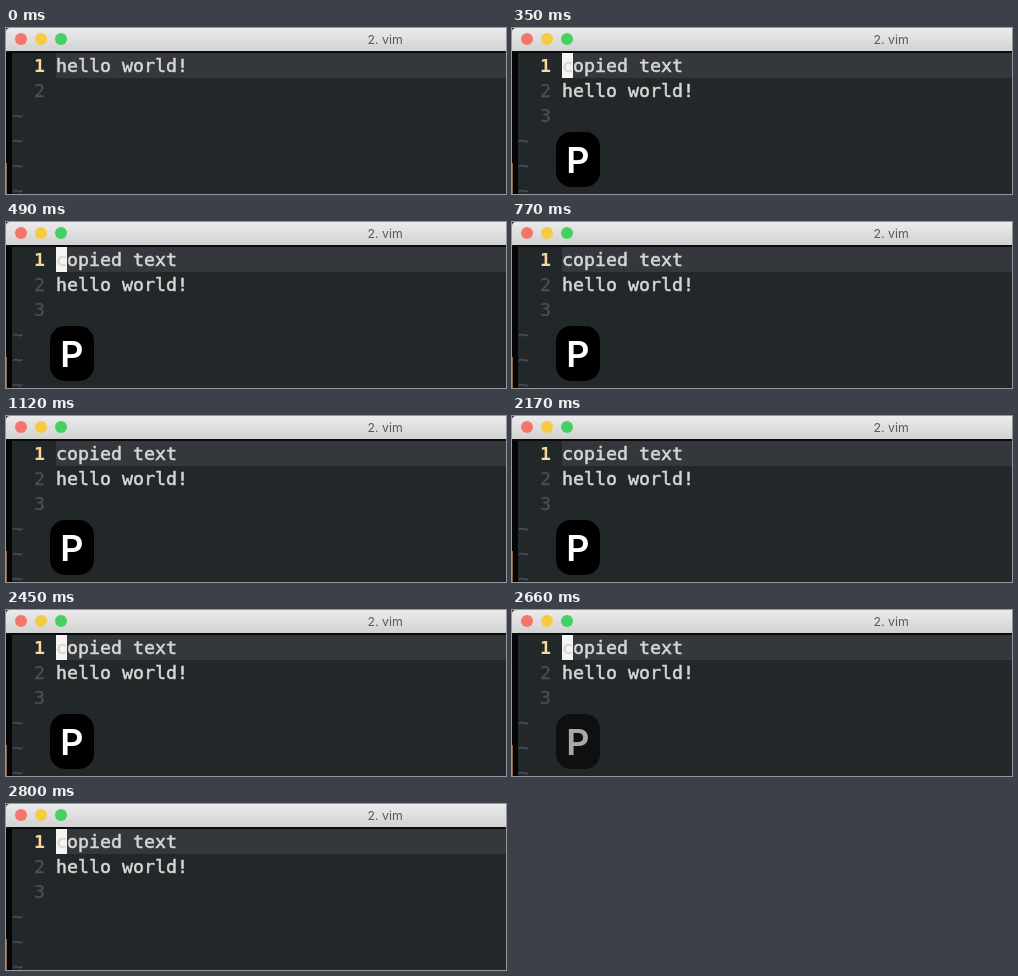
An HTML page that plays this animation: 500x166 px, repeating every 2940 ms.

```html
<!DOCTYPE html>
<html lang="en">
<head>
<meta charset="utf-8">
<title>Paste in vim</title>
<style>
html, body { margin: 0; width: 100%; height: 100%; overflow: hidden; background: #22272a; }
svg { display: block; width: 100%; height: 100%; }
.code { font: 18.27px "DejaVu Sans Mono", "Noto Sans Mono", monospace; }
.code text { fill: #d6d6d3; stroke: #d6d6d3; stroke-width: .55px; }
.code .dim { fill: #4a4f53; stroke: #4a4f53; stroke-width: .3px; }
.code .now { fill: #f8d898; stroke: none; font-weight: bold; }
.title { font: 12.3px Inter, "Open Sans", sans-serif; fill: #5a5a5a; }
.key { font: 600 36px Inter, Roboto, sans-serif; fill: #fff; }

.before, .after, .cursor, .badge { animation: 2940ms step-end infinite; }
.before { animation-name: before; }
.after { animation-name: after; }
.cursor { animation-name: blink; }
.badge { animation-name: press; }

/* the paste lands at 140 ms */
@keyframes before { 0% { opacity: 1 } 4.761%, 100% { opacity: 0 } }
@keyframes after { 0% { opacity: 0 } 4.761%, 100% { opacity: 1 } }

/* 560 ms on, 560 ms off, starting at 210 ms */
@keyframes blink {
  0%, 26.19%, 64.285% { opacity: 0 }
  7.142%, 45.238%, 83.333%, 100% { opacity: 1 }
}

/* appears at 70 ms, fades from 2590 to 2800 ms */
@keyframes press {
  0% { opacity: 0 }
  2.38% { opacity: 1 }
  88.095% { opacity: .86 }
  90.476% { opacity: .6 }
  92.857% { opacity: .28 }
  95.238%, 100% { opacity: 0 }
}
</style>
</head>
<body>
<svg viewBox="0 0 500 166" preserveAspectRatio="none">
  <defs>
    <linearGradient id="bar" x2="0" y2="1">
      <stop stop-color="#ebebeb"/>
      <stop offset="1" stop-color="#d2d2d2"/>
    </linearGradient>
  </defs>

  <rect width="500" height="166" fill="#22272a"/>
  <rect y="22" width="6" height="144" fill="#050506"/>
  <rect y="135" width="1" height="31" fill="#8a6444"/>
  <rect width="8" height="8" fill="#25282c"/>
  <path d="M0 23V4Q0 0 4 0H500V23Z" fill="url(#bar)"/>
  <rect y="23" width="500" height="2" fill="#0a0b0d"/>
  <circle cx="15" cy="11" r="6" fill="#f5746c"/>
  <circle cx="35" cy="11" r="6" fill="#f6ca42"/>
  <circle cx="55" cy="11" r="6" fill="#44d162"/>
  <text class="title" x="361.5" y="15.5">2. vim</text>

  <rect x="50" y="25" width="450" height="25" fill="#34373c"/>

  <g class="code">
    <text class="now" x="28" y="43.7">1</text>
    <text class="dim" x="28" y="68.7">2</text>
    <text class="dim" x="6" y="118.7">~</text>
    <text class="dim" x="6" y="143.7">~</text>
    <text class="dim" x="6" y="168.7">~</text>
    <g class="before">
      <text x="50" y="43.7">hello world!</text>
      <text class="dim" x="6" y="93.7">~</text>
    </g>
    <g class="after">
      <text x="50" y="43.7">copied text</text>
      <text x="50" y="68.7">hello world!</text>
      <text class="dim" x="28" y="93.7">3</text>
    </g>
    <g class="cursor">
      <rect x="50" y="25" width="11" height="25" fill="#f4f4f2"/>
      <text x="50" y="43.7">c</text>
    </g>
  </g>

  <g class="badge">
    <rect x="44" y="104" width="44" height="55" rx="15"/>
    <text class="key" x="54.2" y="144.5">P</text>
  </g>
</svg>
</body>
</html>
```
